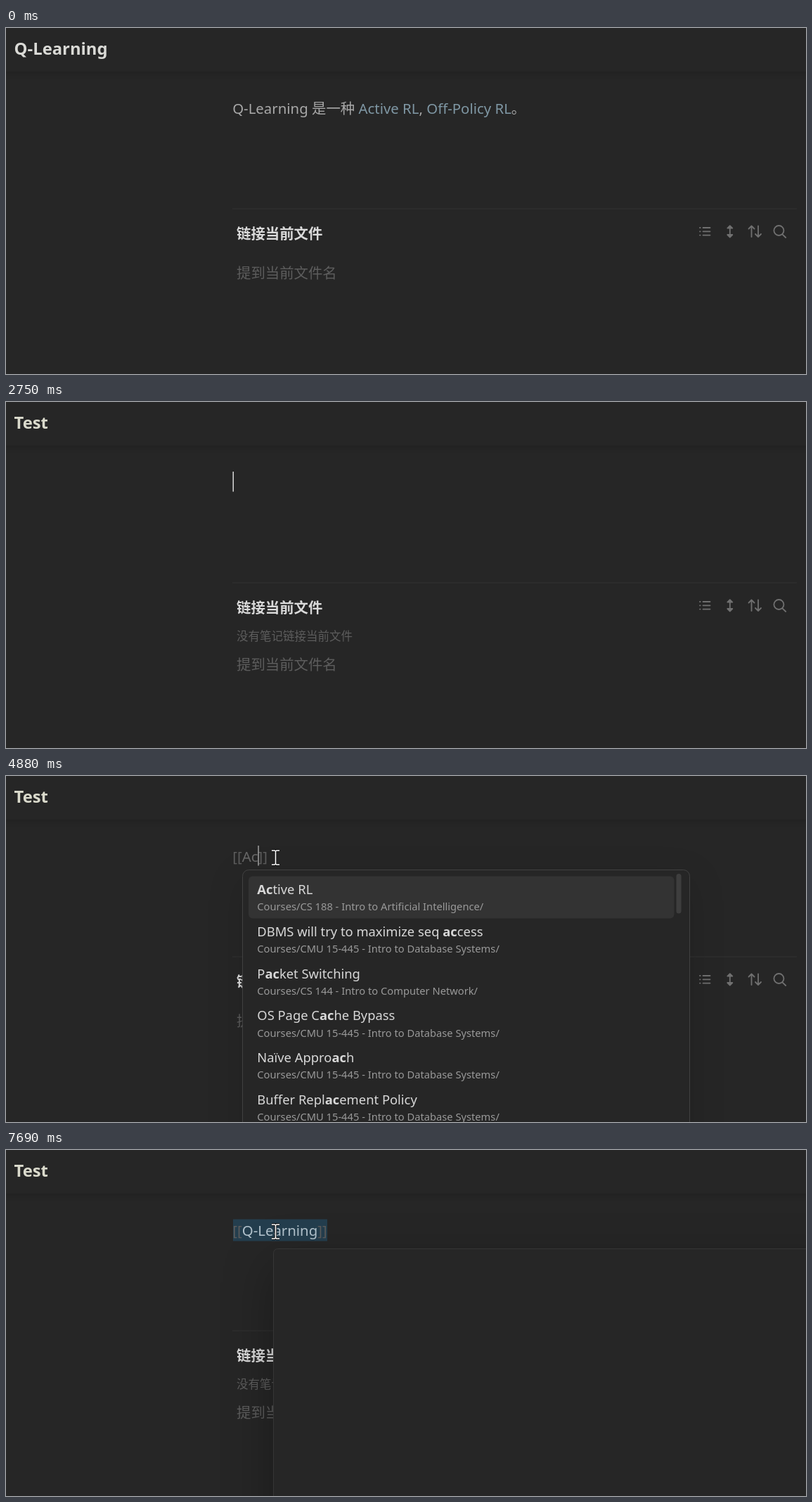
An HTML page that plays this animation: 1138 px wide and 492 px high, repeating every 8 s.

```html
<!DOCTYPE html>
<html lang="zh-CN">
<head>
<meta charset="utf-8">
<title>Note links</title>
<style>
  html, body { margin: 0; width: 100%; height: 100%; overflow: hidden; background: #262626; }
  svg { display: block; }
  text { font-family: 'Noto Sans', 'Noto Sans CJK SC', 'Noto Sans CJK', sans-serif; font-size: 20.4px; fill: #a8a8a8; }
  .head { font-size: 23.8px; font-weight: 600; fill: #dadad6; }
  .bar { fill: #262626; filter: drop-shadow(0 2px 4px rgba(0, 0, 0, .13)); }
  .strong { font-weight: 600; fill: #dadada; }
  .faint { font-weight: 500; fill: #5d5d5d; }
  .hint { font-size: 16.5px; fill: #5d5d5d; }
  .link { fill: #7f97a4; }
  .lit { fill: #b3c3cd; }
  .mark { fill: #5c5c5c; }
  .open { fill: #676767; }
  .icons { fill: none; stroke: #707070; stroke-width: 1.8; stroke-linecap: round; stroke-linejoin: round; }
  .popup { fill: #262626; stroke: #414141; filter: drop-shadow(0 15px 24px rgba(0, 0, 0, .13)); }
  .preview { fill: #262626; stroke: #363636; filter: drop-shadow(0 24px 34px rgba(0, 0, 0, .3)); }
  .picked { fill: #333; }
  .thumb { fill: #3e3e3e; }
  .name { font-size: 18.36px; fill: #d8d8d8; }
  .name tspan { font-weight: 700; }
  .path { font-size: 14.69px; fill: #999; }
  .in { font-size: 13px; fill: #d0d0d0; }
  .cursor { stroke-linejoin: round; }
</style>
</head>
<body>
<svg id="stage" width="1138" height="492" viewBox="0 0 1138 492">
  <rect width="1138" height="492" fill="#262626"/>
  <rect class="bar" x="-10" y="-10" width="1158" height="72"/>
  <text class="head" x="11.6" y="38" data-on="0-2750">Q-Learning</text>
  <text class="head" x="11.6" y="38" style="fill:#dadacc" data-on="2750-8000">Test</text>

  <path d="M322 257H1125" stroke="#333"/>
  <text class="strong" x="328" y="300">链接当前文件</text>
  <text class="hint" x="328" y="339" data-on="2750-2820 6160-8000">没有笔记链接当前文件</text>
  <text class="faint" x="328" y="356" data-on="0-2750 2820-6160">提到当前文件名</text>
  <text class="faint" x="328" y="380.5" data-on="2750-2820 6160-8000">提到当前文件名</text>
  <g class="icons">
    <path d="M987 284h.6M987 289.3h.6M987 294.6h.6M991.5 284H1001.5M991.5 289.3H1001.5M991.5 294.6H1001.5"/>
    <path d="M1029.8 281.5V297M1026.3 284.6l3.5-3.5 3.5 3.5zM1026.3 294l3.5 3.5 3.5-3.5z"/>
    <path d="M1060.5 297V281.5M1056.5 285.5l4-4 4 4M1070 281.5V297M1066 293l4 4 4-4"/>
    <path d="M1104.6 293.6l4.6 4.4"/><circle cx="1099.4" cy="288" r="7"/>
  </g>

  <text x="322.2" y="121.7" data-on="0-2750">Q-Learning 是一种 <tspan id="active">Active RL</tspan>, <tspan id="policy">Off-Policy RL</tspan>。</text>

  <rect x="323" y="98.5" width="134" height="31" fill="#243e4e" data-on="7630-8000"/>
  <text x="322.3" y="121.7" data-on="4150-4290">[]</text>
  <text class="mark" x="322.3" y="121.7" data-on="4290-4480">[[]]</text>
  <text class="mark" x="322.3" y="121.7" data-on="4480-4880">[[<tspan class="open">A</tspan>]]</text>
  <text class="mark" x="322.3" y="121.7" data-on="4880-5360">[[<tspan class="open">Ac</tspan>]]</text>
  <text class="mark" x="322.3" y="121.7" data-on="5360-6960">[[<tspan class="lit">Active RL</tspan>]]</text>
  <text class="mark" x="322.3" y="121.7" data-on="6960-8000">[[<tspan class="lit">Q-Learning</tspan>]]</text>

  <g id="list" data-on="4290-5360">
    <rect class="popup" x="336.5" y="133.5" width="636" height="420" rx="9"/>
    <rect class="picked" x="345" y="142.5" width="605.5" height="60" rx="6"/>
    <rect class="thumb" x="953.5" y="139" width="7" height="56.5" rx="3.5"/>
  </g>
  <g data-on="5430-6960">
    <rect class="popup" x="336.5" y="133.5" width="389" height="77.5" rx="9"/>
    <rect class="picked" x="345" y="142.5" width="372" height="60" rx="6"/>
    <text class="in" x="357.3" y="162">in</text>
    <text class="name" x="387" y="168">Q-Learning</text>
    <text class="path" x="387.3" y="191.3">Courses/CS 188 - Intro to Artificial Intelligence</text>
  </g>
  <rect class="preview" x="380.5" y="140.5" width="800" height="500" rx="6" data-on="7690-8000"/>

  <rect id="caret" y="99" width="1.5" height="28.5"/>
  <g id="cursor" class="cursor">
    <path id="arrow" d="M0 0V18.5L4.3 14.5 7.2 21.4 10.2 20.1 7.3 13.4H13.4Z" fill="#fff" stroke="#111"/>
    <path id="hand" d="M-1.9 1.6Q0 -1 2 1.6V9.2Q4.2 7.5 5.5 9.7 7.6 8.6 8.6 10.7 11.6 9.8 12 13V18.5Q12 22 9.7 25.5H.8Q-1 21.5-5 17.2-7 13.6-4.2 13.4L-1.9 15.4Z" fill="#fff" stroke="#111"/>
    <g id="beam" fill="none">
      <path d="M-5.5 -10H5.5M-5.5 10H5.5M0 -10V10" stroke="#111" stroke-width="3.6"/>
      <path d="M-5.5 -10H-1.2L0 -9 1.2 -10H5.5M-5.5 10H-1.2L0 9 1.2 10H5.5M0 -9V9" stroke="#fff" stroke-width="1.6"/>
    </g>
  </g>
</svg>
<script>
const LOOP = 8000, STEP = 70;
const $ = id => document.getElementById(id);

const ai = 'CS 188 - Intro to Artificial Intelligence';
const db = 'CMU 15-445 - Intro to Database Systems';
const net = 'CS 144 - Intro to Computer Network';

// Asterisks enclose the matched letters.
const lists = [
  ['4290-4550', [['Q-Learning', ai], ['Active RL', ai], ['Off-Policy RL', ai],
    ['Passive RL', ai], ['Buffer Pool', db], ['Packet Switching', net]]],
  ['4550-4880', [['*A*ctive RL', ai], ['*A*lpha-Beta Pruning', ai], ['*A* page table maps virtual pages to physical frames in memory', db],
    ['*A*rc Consistency', ai], ['*A*pproximate Q-Learning', ai], ['*A*ddress Resolution', net]]],
  ['4880-5360', [['*Ac*tive RL', ai], ['DBMS will try to maximize seq *ac*cess', db], ['P*ac*ket Switching', net],
    ['OS Page C*ac*he Bypass', db], ['Naïve Appro*ac*h', db], ['Buffer Repl*ac*ement Policy', db]]],
];

const row = ([name, course], i) => {
  const y = i * 59.75;
  const label = name.replace(/\*(.+?)\*/, '<tspan>$1</tspan>');
  return `<text class="name" x="357.3" y="${168 + y}">${label}</text>
    <text class="path" x="357.3" y="${191.3 + y}">Courses/${course}/</text>`;
};
$('list').innerHTML += lists.map(([on, rows]) => `<g data-on="${on}">${rows.map(row).join('')}</g>`).join('');

const timed = [...document.querySelectorAll('[data-on]')].map(el =>
  [el, el.dataset.on.split(' ').map(span => span.split('-').map(Number))]);

// Caret: from, to, x, colour
const carets = [
  [2750, 3280, 322.5, '#d8d8d8'], [3820, 4150, 322.5, '#d8d8d8'], [4150, 4290, 328.7, '#d8d8d8'],
  [4290, 4480, 335.3, '#a0a0a0'], [4480, 4880, 348.2, '#a0a0a0'], [4880, 5360, 358.3, '#a0a0a0'],
  [5360, 5950, 435, '#999'], [6500, 6960, 435, '#999'], [6960, 7630, 456, '#999'],
];

// Pointer strokes: start time, then one place per step
const strokes = [
  [390, [[1068, 470], [960, 370], [845, 245], [735, 155], [640, 116], [507, 101.5],
    [330, 98], [205, 100], [167, 106], [320, 104], [570, 93], [810, 91]]],
  [1220, [[650, 45], [470, 31], [320, 48], [246, 79]]],
  [1680, [[224, 115], [196, 157]]],
  [3010, [[372, 276], [376, 225], [380, 175], [382, 136], [379, 116]]],
  [3480, [[374, 118], [389, 113], [383.5, 116]]],
];

function pointer(t) {
  if (t < 390 || (t >= 2750 && t < 3010)) return null;
  const [start, places] = strokes.filter(s => t >= s[0]).pop();
  return places[Math.min(places.length - 1, Math.floor((t - start) / STEP))];
}

function linkAt(t) {
  const p = t < 2750 && pointer(t);
  if (!p || p[1] < 100 || p[1] > 128) return null;
  if (p[0] > 501 && p[0] < 588) return 'active';
  return p[0] > 599 && p[0] < 720 ? 'policy' : null;
}

function shapeAt(t, [x, y]) {
  if (linkAt(t)) return 'hand';
  return x > 322 && x < 1125 && y > 95 && y < 257 ? 'beam' : 'arrow';
}

const show = (el, on) => { el.style.display = on ? '' : 'none'; };

function draw(t) {
  for (const [el, spans] of timed) show(el, spans.some(([a, b]) => t >= a && t < b));

  const caret = carets.find(([a, b]) => t >= a && t < b);
  show($('caret'), caret);
  if (caret) {
    $('caret').setAttribute('x', caret[2]);
    $('caret').setAttribute('fill', caret[3]);
  }

  // The link highlight trails the pointer by one step.
  const lit = linkAt(t - STEP);
  for (const id of ['active', 'policy']) $(id).setAttribute('class', id === lit ? 'lit' : 'link');

  const p = pointer(t);
  show($('cursor'), p);
  if (p) {
    $('cursor').setAttribute('transform', `translate(${p})`);
    const shape = shapeAt(t, p);
    for (const id of ['arrow', 'hand', 'beam']) show($(id), id === shape);
  }
}

const begin = performance.now();
function tick() {
  draw((performance.now() - begin) % LOOP);
  requestAnimationFrame(tick);
}
tick();
</script>
</body>
</html>
```
